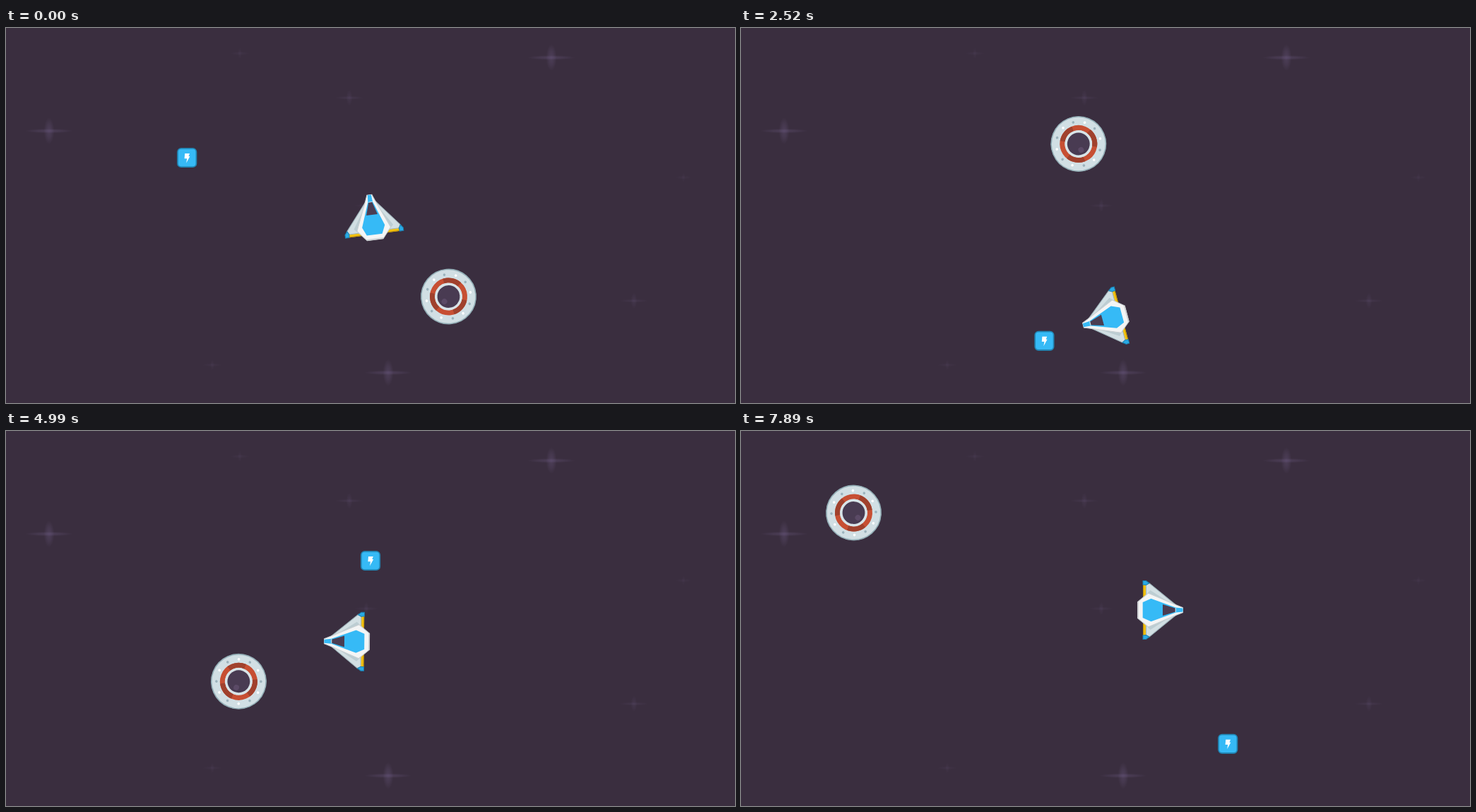
An HTML page with a canvas that plays this animation: 1032x532 px, repeating every 8 s.

```html
<!DOCTYPE html>
<html lang="en">
<head>
<meta charset="utf-8">
<title>Space pickup</title>
<style>
  html, body { margin: 0; width: 100%; height: 100%; overflow: hidden; background: #3a2e3f; }
  canvas { display: block; width: 1032px; height: 532px; }
</style>
</head>
<body>
<canvas id="stage" width="1032" height="532"></canvas>
<script>
const ctx = document.getElementById('stage').getContext('2d');
const LOOP = 8000, STEP = 138.4, DEG = Math.PI / 180;

// All key times count steps, as the picture advances step by step.

// Waypoints: step, x, y, quarter turns begun there
const route = [
  [-1, 565, 278, 1], [0, 518.5, 268.5, 0], [5, 302.5, 172.5, 0], [7, 291, 131, 2],
  [10, 284, 305, -1], [12, 315, 398, 0], [17, 524, 411, 2], [24, 305.5, 424, 0],
  [27, 197, 397, 1], [29, 225, 396, 1], [32, 395, 451, -1], [34, 450, 405, -1],
  [36, 482.5, 298.5, 0], [38, 515, 219, 2], [42, 613, 253, 1], [46, 428.5, 323.5, 0],
  [48, 338, 438, 1], [51, 302, 418, 1], [53, 372, 315, 1], [57, 593.5, 254, 0]
];

// The station flies straight between bounces: step, x, y, spin
const bounces = [
  [0, 626.5, 381, 130], [4.365, 590.5, 483.1, 153], [22.94, 437, 49, 36],
  [41.33, 285.5, 480.3, 142], [57, 159.5, 116, 49]
];

// Pickups sit on a grid: step, column, row
const CELL = 86.6;
const pickups = [[0, 0, 0], [5, 2, 3], [21, 0, 2], [28, 3, 0], [38, 1, 2], [50, 5, 3]];

// x, y, size
const stars = [
  [772, 42, 1], [61, 146, 1], [541, 489, 1], [510, 252, .5], [486, 99, .6],
  [331, 36, .4], [959, 212, .35], [889, 387, .6], [292, 478, .4]
];

function span(keys, t) {
  let i = 0;
  while (i < keys.length - 2 && keys[i + 1][0] <= t) i++;
  const a = keys[i], b = keys[i + 1];
  return { i, a, b, u: (t - a[0]) / (b[0] - a[0]) };
}

function straight(keys, t) {
  const { a, b, u } = span(keys, t);
  return a.slice(1).map((v, k) => v + (b[k + 1] - v) * u);
}

function glide(keys, t) {
  const { i, a, b, u } = span(keys, t);
  const h = b[0] - a[0], u2 = u * u, u3 = u2 * u;
  const slope = (n, k) => {
    const p = keys[Math.max(0, n - 1)], q = keys[Math.min(keys.length - 1, n + 1)];
    return (q[k] - p[k]) / (q[0] - p[0]);
  };
  return [1, 2].map(k =>
    a[k] * (2 * u3 - 3 * u2 + 1) + b[k] * (3 * u2 - 2 * u3) +
    h * (slope(i, k) * (u3 - 2 * u2 + u) + slope(i + 1, k) * (u3 - u2)));
}

// Each turn closes 11/12 of its remaining angle per step.
function heading(t) {
  return route.reduce((sum, [t0, , , turn]) =>
    t > t0 ? sum + turn * 90 * (1 - 12 ** (t0 - t)) : sum, -90);
}

function poly(points, fill, stroke) {
  ctx.beginPath();
  points.forEach(([x, y]) => ctx.lineTo(x, y));
  ctx.closePath();
  ctx.fillStyle = fill;
  ctx.fill();
  if (stroke) {
    ctx.strokeStyle = stroke;
    ctx.lineWidth = 1;
    ctx.stroke();
  }
}

// Polygon symmetric about the vertical axis, given its right side from top to bottom
function hull(side, fill, stroke) {
  const left = side.map(([x, y]) => [-x, y]).reverse();
  poly([...side, ...left], fill, stroke);
}

function disc(x, y, r, fill) {
  ctx.beginPath();
  ctx.arc(x, y, r, 0, 2 * Math.PI);
  ctx.fillStyle = fill;
  ctx.fill();
}

function ring(r, width, color, from = 0, to = 360) {
  ctx.beginPath();
  ctx.arc(0, 0, r, from * DEG, to * DEG);
  ctx.lineWidth = width;
  ctx.strokeStyle = color;
  ctx.stroke();
}

function at(x, y, angle, draw) {
  ctx.save();
  ctx.translate(x, y);
  ctx.rotate(angle * DEG);
  draw();
  ctx.restore();
}

function glow(x, y, rx, ry, alpha) {
  ctx.save();
  ctx.translate(x, y);
  ctx.scale(rx, ry);
  const g = ctx.createRadialGradient(0, 0, 0, 0, 0, 1);
  [alpha, alpha * .6, 0].forEach((a, k) => g.addColorStop(k / 2, `rgba(120,101,146,${a})`));
  disc(0, 0, 1, g);
  ctx.restore();
}

function drawStar([x, y, size]) {
  const alpha = .3 * size ** 1.4;
  glow(x, y, 34 * size, Math.max(2.5, 3.3 * size), alpha);
  glow(x, y, 7.5 * size, 19 * size, alpha);
}

function drawPickup() {
  ctx.beginPath();
  ctx.roundRect(-13.2, -13.2, 26.4, 26.4, 5);
  ctx.fillStyle = '#36baf6';
  ctx.fill();
  ctx.strokeStyle = '#2185b3';
  ctx.lineWidth = 1.8;
  ctx.stroke();
  poly([[-3, -6], [3.8, -6], [2.3, -2], [4.2, -2], [-1, 7.5], [0, 1.3], [-3.6, 1.3]], '#fff');
}

function drawStation() {
  disc(0, 0, 39, '#d1dfe4');
  ring(38.6, 1.6, '#93afb7');
  ring(23, 7, '#c74f33');
  for (let k = 0; k < 3; k++) ring(23, 7, '#a0412d', 2 + k * 120, 62 + k * 120);
  ring(17.5, 3.4, '#d8e4e8');
  disc(0, 0, 15.9, '#493b52');
  disc(9.2, 0, 4, '#5b4a66');
  for (let k = 0; k < 12; k++) {
    const a = (k * 30 - 51) * DEG;
    disc(31.5 * Math.cos(a), 31.5 * Math.sin(a), 1.8, k % 2 ? '#fff' : '#9bb2bc');
  }
}

function drawWing() {
  poly([[-37, 19], [-16, 19], [-16, 24.3], [-37, 24.3]], '#f7c50f');
  poly([[-37, 23], [-16, 23], [-16, 24.3], [-37, 24.3]], '#c99a0a');
  poly([[-4, -26], [-38.5, 16], [-37, 20], [-20, 20], [-2, -10]], '#d2dfe3', '#9eb4bb');
  poly([[-5, -22], [-28, 14], [-22, 20], [-8, 10]], '#bccdd2');
  poly([[-38, 15.5], [-41.5, 20], [-41.5, 24.5], [-36, 24.5], [-35.5, 20]], '#29aae5', '#1b7fae');
}

function drawShip() {
  drawWing();
  ctx.save();
  ctx.scale(-1, 1);
  drawWing();
  ctx.restore();
  hull([[3.5, -32], [7, -23], [24, 17], [11.5, 32]], '#f4f5f5', '#c9d0d3');
  hull([[12.5, 30.5], [11.5, 32.3]], '#cfd2d4');
  hull([[2.5, -32], [3.4, -22], [16.2, 13], [11, 24.8]], '#36baf6');
  hull([[2.5, -21.5], [8, -3.5]], '#4a3d52');
  hull([[3, -22.2], [3, -21.2]], '#d5e5ed');
}

function frame(ms) {
  const t = Math.floor(ms % LOOP / STEP);
  ctx.fillStyle = '#3a2e3f';
  ctx.fillRect(0, 0, 1032, 532);
  stars.forEach(drawStar);

  const [, col, row] = pickups.filter(p => p[0] <= t).pop();
  at(256.2 + col * CELL, 184 + row * CELL, 0, drawPickup);
  at(...straight(bounces, t), drawStation);
  at(...glide(route, t), heading(t), drawShip);
}

const start = performance.now();
function tick() {
  frame(performance.now() - start);
  requestAnimationFrame(tick);
}
tick();
</script>
</body>
</html>
```
